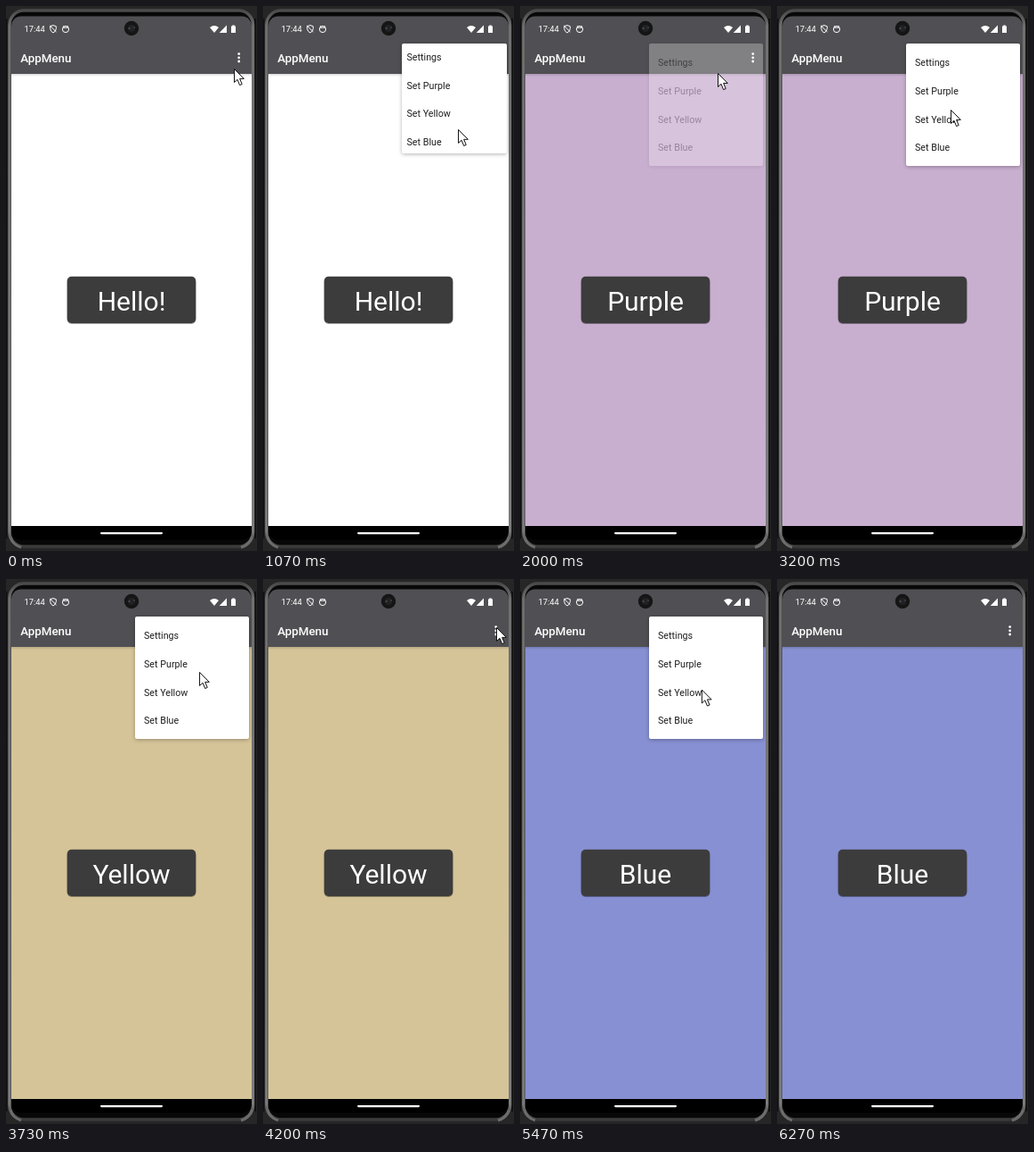
An HTML page that plays this animation: 282 px wide and 610 px high, repeating every 6.87 s.

```html
<!DOCTYPE html>
<html lang="en">
<head>
<meta charset="utf-8">
<style>
html, body { margin: 0; width: 100%; height: 100%; overflow: hidden; background: #262626; }
svg, #menu { position: absolute; left: 0; top: 0; }
text, #menu { font-family: Roboto, sans-serif; }
#menu { top: 42px; overflow: hidden; background: #fff; border-radius: 2px;
  box-shadow: 0 1px 4px rgba(0,0,0,.3); font-size: 10.67px; letter-spacing: .03px; color: #1d1d1d; }
#items { position: absolute; white-space: nowrap; line-height: 31.6px; }
</style>
</head>
<body>
<svg width="282" height="610">
  <defs>
    <linearGradient id="shade" x2="0" y2="1">
      <stop stop-color="#000" stop-opacity=".14"/><stop offset="1" stop-color="#000" stop-opacity="0"/>
    </linearGradient>
    <linearGradient id="metal" x2="0" y2="1">
      <stop stop-color="#4a4a4a"/><stop offset=".03" stop-color="#707070"/>
      <stop offset=".97" stop-color="#7c7c7c"/><stop offset="1" stop-color="#3a3a3a"/>
    </linearGradient>
    <clipPath id="screen"><rect x="6" y="11.5" width="270" height="586" rx="11"/></clipPath>
  </defs>
  <!-- phone body -->
  <path d="M.5 14V596M280 14V596" stroke="#101010" stroke-width="2"/>
  <rect x="4" y="5" width="273.5" height="600" rx="16" fill="#080808" stroke="url(#metal)" stroke-width="3.4"/>
  <path d="M5 594Q7 603 17 606M276.5 594Q274 603 264 606" fill="none" stroke="#6c6c6c" stroke-width="3"/>
  <g clip-path="url(#screen)">
    <rect id="page" x="6" y="70" width="270" height="512"/>
    <rect x="6" y="11" width="270" height="65" fill="#504f53"/>
    <rect x="6" y="76" width="270" height="3" fill="url(#shade)"/>
    <rect x="6" y="582" width="270" height="20"/>
  </g>
  <rect x="106" y="589" width="70" height="2.2" rx="1.1" fill="#fff"/>
  <!-- status bar -->
  <circle cx="141" cy="25" r="8.2" fill="#151515"/>
  <circle cx="141" cy="25" r="4" fill="#202225"/>
  <circle cx="138.5" cy="25" r="1" fill="#555"/><circle cx="144" cy="24" r=".8" fill="#555"/>
  <g fill="#fff">
    <text x="20.5" y="29" font-size="9.33">17:44</text>
    <g fill="none" stroke="#fff">
      <path d="M49.7 22.7L53 21.6L56.3 22.7V25.5Q56 28.5 53 30Q50 28.5 49.7 25.5ZM49.3 22L56.5 29"/>
      <circle cx="67" cy="26" r="3.6"/><path d="M64 24.2H70M64.3 22.4L65.5 23.5M69.7 22.4L68.5 23.5"/>
    </g>
    <path d="M229 24Q234 20 239 24L234 30Z"/>
    <path d="M248 21.5V30H239.7Z"/>
    <path d="M253 22.6H254.3V21.6H256.7V22.6H258V30H253Z"/>
    <text x="16.2" y="63" font-size="13.33" font-weight="500">AppMenu</text>
    <circle cx="261.7" cy="53.6" r="1.4"/><circle cx="261.7" cy="57.8" r="1.4"/><circle cx="261.7" cy="62" r="1.4"/>
  </g>
  <!-- button -->
  <rect x="68.7" y="304" width="144.6" height="52" rx="5" fill="#000" opacity=".35"/>
  <rect x="68.7" y="302.8" width="144.6" height="52.2" rx="5" fill="#3c3c3c"/>
  <text id="label" x="141" y="341" font-size="30" text-anchor="middle" fill="#fff"></text>
</svg>
<div id="menu"><div id="items">Settings<br>Set Purple<br>Set Yellow<br>Set Blue</div></div>
<svg width="282" height="610">
  <path id="cursor" d="M.5 .5V15.5L4 12.3L6.6 18.6L9.2 17.5L6.6 11.4H11.3Z" fill="#fff" stroke="#111"/>
</svg>
<script>
const LOOP = 6870, STEP = 200 / 3;
const [page, label, menu, items, cursor] =
  ["page", "label", "menu", "items", "cursor"].map(id => document.getElementById(id));

// start time, page colour, button text
const pages = [
  [0, "#fff", "Hello!"], [1860, "#c8aecf", "Purple"],
  [3590, "#d5c498", "Yellow"], [5390, "#8790d2", "Blue"]
];
// opening starts, fading starts
const menus = [[927, 1904], [2790, 3735], [4605, 5470]];
// time, x, y of the cursor tip
const path = [
  [0, 256, 70], [70, 256, 70], [400, 261, 50], [730, 261, 50], [1067, 219, 138],
  [1400, 197, 112], [1467, 193, 102], [1667, 193, 102], [2000, 222, 75], [2267, 261, 50],
  [2400, 262, 52], [2600, 262, 52], [3200, 195, 116], [3600, 195, 117], [3733, 217, 104],
  [4000, 258, 56], [4200, 262, 54], [4400, 262, 54], [4800, 183, 145], [5067, 180, 152],
  [5330, 180, 152], [5800, 262, 54], [LOOP, 262, 54]
];
const HIDE = 6130, OPEN = 267, FADE = 133;
const clamp = v => Math.min(1, Math.max(0, v));

function drawMenu(t) {
  const span = menus.find(([start, end]) => t >= start && t < end + FADE);
  menu.style.display = span ? "block" : "none";
  if (!span) return;
  const u = clamp((t - span[0]) / OPEN);
  const q = (1 - u) ** 3;
  const left = 145 + 100 * q, right = 273 + 10 * q;
  menu.style.left = left + "px";
  menu.style.width = right - left + "px";
  menu.style.height = 137 * (1 - .95 * q) + "px";
  menu.style.opacity = clamp(u / .35) * (1 - clamp((t - span[1]) / FADE));
  items.style.left = 155 + 60 * q - left + "px";
  items.style.top = 6.4 - 60 * q + "px";
}

function drawCursor(t) {
  const i = path.findIndex(p => p[0] > t);
  const [t0, x0, y0] = path[i - 1], [t1, x1, y1] = path[i];
  const k = (t - t0) / (t1 - t0);
  cursor.setAttribute("transform", `translate(${x0 + (x1 - x0) * k} ${y0 + (y1 - y0) * k})`);
  cursor.style.display = t < HIDE ? "" : "none";
}

function draw(now) {
  const t = Math.floor((now % LOOP + 5) / STEP) * STEP;
  const [, colour, word] = pages.findLast(p => t >= p[0]);
  page.setAttribute("fill", colour);
  label.textContent = word;
  drawMenu(t);
  drawCursor(t);
}

const begin = performance.now();
(function frame() {
  draw(performance.now() - begin);
  requestAnimationFrame(frame);
})();
</script>
</body>
</html>
```
